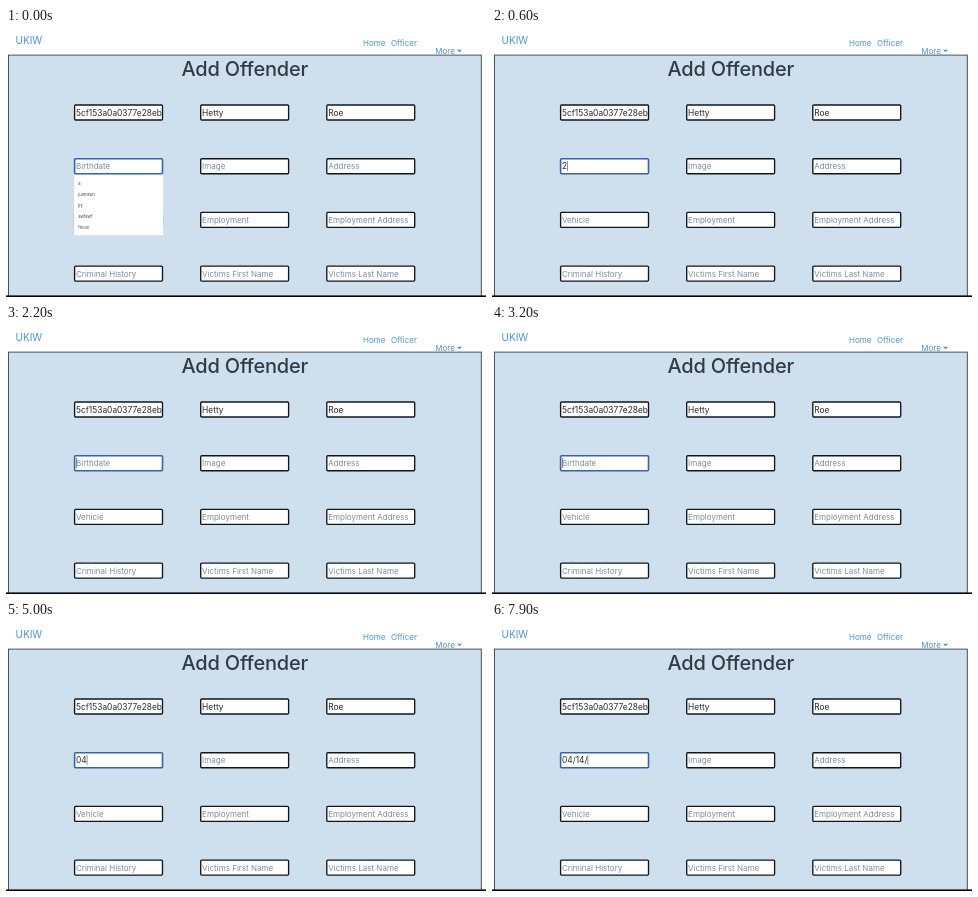
These frames come from a looping animation (480x269 px, 8 s). An HTML page:

```html
<!DOCTYPE html>
<html lang="en">
<head>
<meta charset="utf-8">
<title>Add Offender</title>
<style>
  html, body { margin: 0; width: 100%; height: 100%; overflow: hidden; background: #fff; }
  svg { display: block; width: 100%; height: 100%; font: 8px Inter, "Open Sans", sans-serif; }
  text { white-space: pre; }
  .link { fill: #4b93d3; }
  .brand { font-size: 10px; }
  .title { font-size: 20px; font-weight: 500; letter-spacing: -.01em; fill: #333c45; text-anchor: middle; }
  .panel { fill: #cedfed; stroke: #36424c; stroke-width: .9; }
  .field { fill: #fff; stroke: #12171d; stroke-width: 1.35; }
  .focus { stroke: #3a62a8; stroke-width: 1.6; }
  .value { font-size: 8.4px; fill: #262c32; }
  .hint { fill: #7d8d9d; }
  .menu rect { fill: #fff; stroke: #d3dbe2; stroke-width: .4; }
  .menu text { font-size: 4.1px; fill: #40464c; }
  .menu { animation: menu 8s step-end infinite; }
  @keyframes menu { 0% { visibility: visible; } 7.5%, 100% { visibility: hidden; } }
</style>
</head>
<body>
<svg viewBox="0 0 480 269" preserveAspectRatio="none">
  <rect class="panel" x="2.5" y="27.1" width="472.8" height="250"/>
  <text class="link brand" x="9.5" y="15.7">UKIW</text>
  <text class="link" x="357" y="18.3">Home</text>
  <text class="link" x="385" y="18.3">Officer</text>
  <text class="link" x="429.3" y="25.8">More</text>
  <path class="link" d="M451 21.7h5l-2.5 2.6z"/>
  <text class="title" x="238.8" y="48.2">Add Offender</text>
  <clipPath id="clip"><rect x="68" y="70" width="88.5" height="199"/></clipPath>
  <g id="fields"></g>
  <rect id="caret" y="133" width=".7" height="10" fill="#5c656d"/>
  <g class="menu" id="menu"><rect x="68" y="147" width="89.3" height="60.4"/></g>
  <rect y="267.4" width="480" height="1.6" fill="#05080b"/>
</svg>
<script>
  const LOOP = 8000;
  const byId = id => document.getElementById(id);

  function add(parent, tag, attrs, content = '') {
    const node = document.createElementNS('http://www.w3.org/2000/svg', tag);
    for (const key in attrs) node.setAttribute(key, attrs[key]);
    node.textContent = content;
    return parent.appendChild(node);
  }

  const rows = [
    ['5cf153a0a0377e28eb', 'Hetty', 'Roe'],
    ['Birthdate', 'Image', 'Address'],
    ['Vehicle', 'Employment', 'Employment Address'],
    ['Criminal History', 'Victims First Name', 'Victims Last Name']
  ];
  let birthdate;

  rows.forEach((row, r) => row.forEach((label, c) => {
    const x = 68.6 + c * 126.1, y = 77 + r * 53.7;
    const active = r === 1 && c === 0;
    add(byId('fields'), 'rect', {
      class: active ? 'field focus' : 'field', x, y, width: 87.9, height: 15, rx: 1
    });
    const attrs = { class: r ? 'hint' : 'value', x: x + 1.4, y: y + 10.5 };
    if (c === 0) attrs['clip-path'] = 'url(#clip)';
    const text = add(byId('fields'), 'text', attrs, label);
    if (active) birthdate = text;
  }));

  ['a', 'judhlkuh', 'jhj', 'awfawf', 'fnouh'].forEach((word, i) =>
    add(byId('menu'), 'text', { x: 72.2, y: 157.1 + i * 11 }, word));

  // [start in ms, typed text, caret shown]
  const steps = [
    [0, '', false],
    [600, '2', true], [700, '23', true], [1100, '23', false], [1700, '23', true],
    [2100, '2', true], [2200, '', true], [2700, '', false], [3200, '', true], [3700, '', false],
    [4100, '0', true], [4600, '04', true],
    [5200, '04/', true], [5700, '04/', false], [6200, '04/', true], [6700, '04/', false],
    [7000, '04/1', true], [7500, '04/14', true], [7900, '04/14/', true]
  ];
  let shown;

  function draw(now) {
    const time = now % LOOP;
    const step = steps.findLast(([start]) => start <= time);
    if (step !== shown) {
      const [, typed, caretOn] = shown = step;
      birthdate.textContent = typed || 'Birthdate';
      birthdate.setAttribute('class', typed ? 'value' : 'hint');
      const width = typed ? birthdate.getComputedTextLength() : 0;
      byId('caret').setAttribute('x', 70 + width);
      byId('caret').style.visibility = caretOn ? 'visible' : 'hidden';
    }
    requestAnimationFrame(draw);
  }
  draw(0);
</script>
</body>
</html>
```
